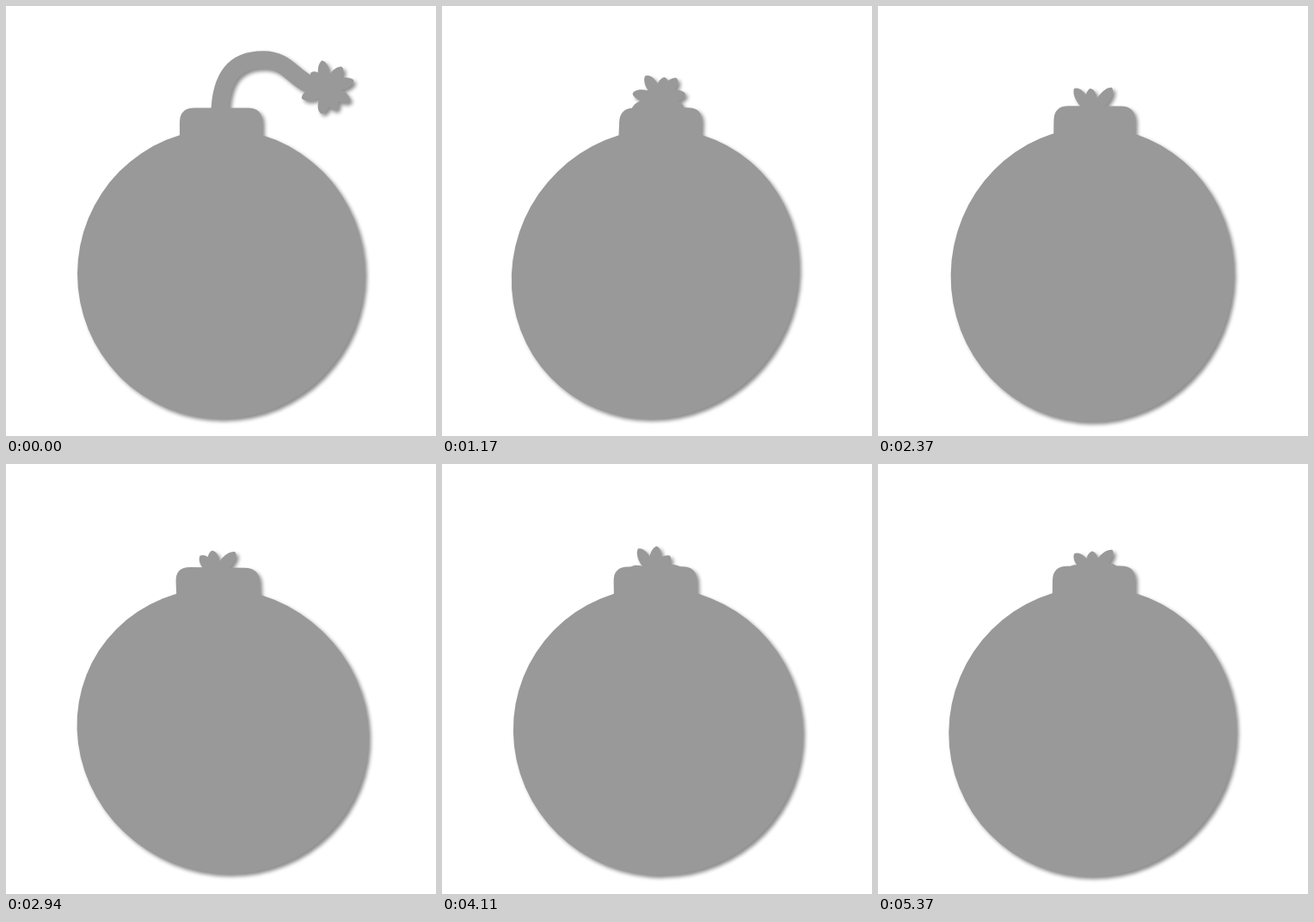
Animation of 500x500 px, one loop 5.4 s. Source, as an HTML page:

```html
<!DOCTYPE html>
<html lang="en">
<head>
<meta charset="utf-8">
<title>Burning fuse</title>
<style>
  html, body { margin: 0; width: 100%; height: 100%; overflow: hidden; background: #fff; }
  svg { display: block; width: 100%; height: 100%; }
  .shadow { filter: drop-shadow(3px 3px 2px rgba(0, 0, 0, .45)); }
</style>
</head>
<body>
<svg viewBox="0 0 500 500">
  <g class="shadow">
    <g id="bomb" fill="#999">
      <ellipse cx="250" cy="311.500" rx="167" ry="168.500"/>
      <path d="M202 160V135Q202 118.500 219 118.500H281Q298 118.500 298 135V160Z"/>
      <path id="fuse" d="M248.500 127C249 88 261 62.500 299 62.500C332 62.500 334 92 373 97"
            fill="none" stroke="#999" stroke-width="20.500"/>
      <path id="spark"/>
    </g>
  </g>
</svg>
<script>
const LOOP = 5400, STEP = 30, BURN = 1350;
const PETALS = 9, CORE = 13, PETAL_WIDTH = 9;
const [bomb, fuse, spark] = ['bomb', 'fuse', 'spark'].map(id => document.getElementById(id));
const fuseLength = fuse.getTotalLength();

// Repeatable noise from 0 to 1
function noise(a, b) {
  const value = Math.sin(a * 12.9898 + b * 78.233) * 43758.5453;
  return value - Math.floor(value);
}

function petalPath(center, angle, length) {
  const cos = Math.cos(angle), sin = Math.sin(angle), width = PETAL_WIDTH;
  const at = (along, across) =>
    `${(center.x + along * cos - across * sin).toFixed(2)} ${(center.y + along * sin + across * cos).toFixed(2)}`;
  return `M${at(0, 0)}C${at(length * .2, -width)} ${at(length * .85, -width)} ${at(length, 0)}` +
    `C${at(length * .95, width)} ${at(length * .3, width)} ${at(0, 0)}Z`;
}

function sparkPath(center, step) {
  let path = `M${center.x - CORE} ${center.y}a${CORE} ${CORE} 0 1 1 ${2 * CORE} 0a${CORE} ${CORE} 0 1 1 ${-2 * CORE} 0Z`;
  for (let i = 0; i < PETALS; i++) {
    const angle = -Math.PI / 2 + (i + .5 * (noise(step, i) - .5)) * 2 * Math.PI / PETALS;
    const length = 25 + 12 * noise(i + 20, step);
    path += petalPath(center, angle, length);
  }
  return path;
}

function draw(time) {
  // Jelly wobble: whole waves per loop, at rest where the loop closes
  const wave = count => Math.sin(2 * Math.PI * count * time / LOOP);
  const squash = .01 * wave(2) - .009 * wave(5);
  const skewX = .026 * wave(8) + .013 * wave(4);
  const skewY = .011 * wave(12) - .014 * wave(7);
  bomb.setAttribute('transform',
    `translate(250 250) matrix(${1 + squash} ${skewY} ${skewX} ${1 - squash} 0 0) translate(-250 -250)`);

  const left = fuseLength * Math.max(0, 1 - time / BURN) ** 1.1;
  fuse.setAttribute('stroke-dasharray', `${left} 999`);
  spark.setAttribute('d', sparkPath(fuse.getPointAtLength(left), Math.round(time / STEP)));
}

const start = performance.now();
function tick() {
  const elapsed = (performance.now() - start) % LOOP;
  draw(Math.floor(elapsed / STEP) * STEP);
  requestAnimationFrame(tick);
}
tick();
</script>
</body>
</html>
```
